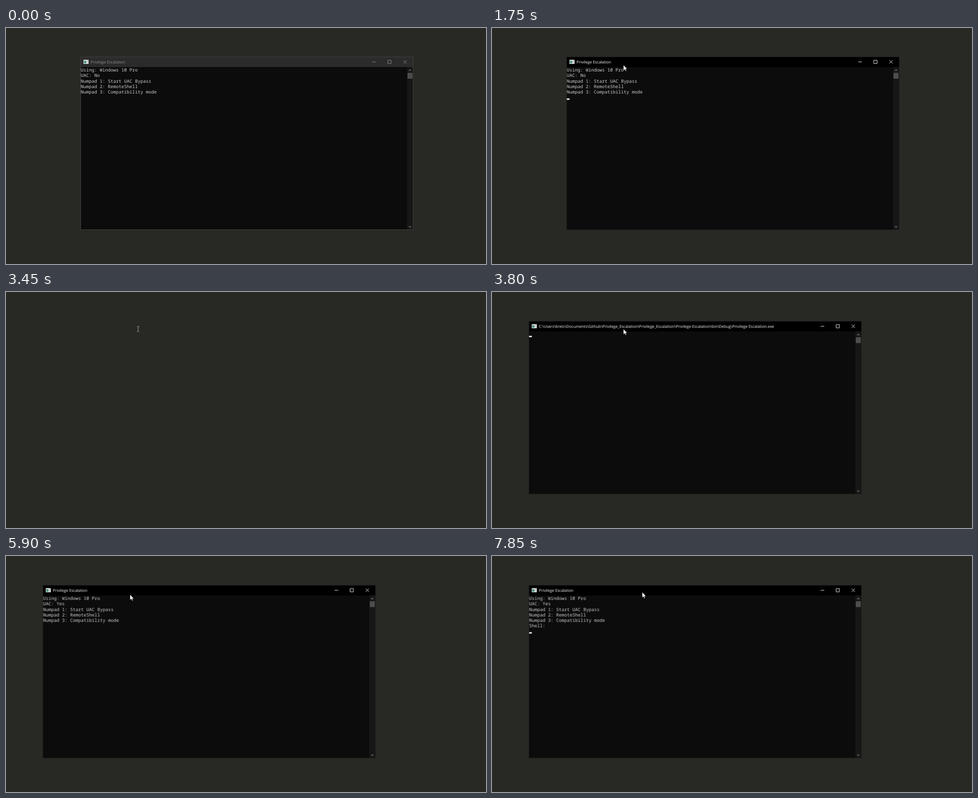
An HTML page for the animation above (8000 ms loop, 1064 px wide and 526 px high).

```html
<!DOCTYPE html>
<html lang="en">
<head>
<meta charset="utf-8">
<title>Console</title>
<style>
html, body { margin: 0; width: 100%; height: 100%; overflow: hidden; background: #282924; }
svg { display: block; width: 1064px; height: 526px; }
text { white-space: pre; text-rendering: geometricPrecision; stroke: none; }
.title { font: 8.62px "Open Sans", "Noto Sans", sans-serif; fill: currentColor; }
.line { font: 10.03px "Noto Sans Mono", "DejaVu Sans Mono", monospace; fill: #ccc; }
.ink { fill: none; stroke: currentColor; stroke-width: 1; }
.caret { fill: #fff; stroke: none; }
.win { fill: #000; color: #fff; stroke: #1c1c1c; }

/* one 8 s clock, 1% = 80 ms, all changes hard */
.win, .caret, .mouse, .t { animation: 8s step-end infinite; }

#first { animation-name: first; }
@keyframes first {
  0% { opacity: 1; fill: #2b2b2b; color: #8e8e8e; stroke: #434343; }
  15% { opacity: 1; fill: #000; color: #fff; stroke: #1c1c1c; }
  43.125%, 100% { opacity: 0; fill: #000; color: #fff; stroke: #1c1c1c; }
}
#second { animation-name: second; }
@keyframes second { 0% { opacity: 0; } 47.5%, 100% { opacity: 1; } }

#path { animation-name: path; }
@keyframes path { 0% { opacity: 1; } 49.375%, 100% { opacity: 0; } }
#ready { animation-name: ready; }
@keyframes ready { 0% { opacity: 0; } 49.375%, 100% { opacity: 1; } }
#key { animation-name: key; }
@keyframes key { 0% { opacity: 0; } 39.375%, 100% { opacity: 1; } }
#shell { animation-name: shell; }
@keyframes shell { 0% { opacity: 0; } 98.125%, 100% { opacity: 1; } }

#caret1 { animation-name: blink1; }
@keyframes blink1 {
  0% { opacity: 0; transform: translate(0, 60.15px); }
  21.875% { opacity: 1; transform: translate(0, 60.15px); }
  28.125% { opacity: 0; transform: translate(0, 60.15px); }
  35% { opacity: 1; transform: translate(0, 60.15px); }
  39.375%, 100% { opacity: 1; transform: translate(6.02px, 60.15px); }
}
#caret2 { animation-name: blink2, row; }
@keyframes blink2 {
  0%, 47.5%, 66.875%, 80%, 93.75%, 100% { opacity: 1; }
  60%, 73.75%, 86.875% { opacity: 0; }
}
@keyframes row {
  0% { transform: none; }
  49.375% { transform: translate(0, 60.15px); }
  98.125%, 100% { transform: translate(0, 72.18px); }
}

.mouse { animation-name: move; }
@keyframes move {
  0% { transform: translate(395px, 513px); }
  8.125% { transform: translate(371px, 412px); }
  8.75% { transform: translate(350px, 324px); }
  9.375% { transform: translate(332px, 250px); }
  10% { transform: translate(317px, 190px); }
  10.625% { transform: translate(306px, 143px); }
  11.25% { transform: translate(298px, 109px); }
  11.875% { transform: translate(293px, 89px); }
  12.5% { transform: translate(291.4px, 82.4px); }
  68.125% { transform: translate(288px, 83px); }
  68.75% { transform: translate(283px, 84px); }
  73.75% { transform: translate(275px, 86px); }
  74.375% { transform: translate(258px, 92px); }
  75% { transform: translate(228px, 103px); }
  75.625% { transform: translate(192px, 115px); }
  76.25% { transform: translate(162px, 124px); }
  77.5% { transform: translate(147px, 127px); }
  81.875% { transform: translate(190px, 118px); }
  82.5% { transform: translate(285px, 92px); }
  83.125%, 100% { transform: translate(333px, 80.6px); }
}
#beam { animation-name: beam; }
@keyframes beam {
  0%, 8.125%, 47.5%, 100% { opacity: 0; }
  7.5%, 43.125% { opacity: 1; }
}
#arrow { animation-name: arrow; }
@keyframes arrow {
  0%, 43.125% { opacity: 0; }
  8.125%, 47.5%, 100% { opacity: 1; }
}
#busy { animation-name: busy; }
@keyframes busy {
  0%, 43.125%, 100% { opacity: 0; transform: translate(10.4px, -.4px); }
  41.25% { opacity: 1; transform: translate(10.4px, -.4px) rotate(-90deg); }
  41.875% { opacity: 1; transform: translate(10.4px, -.4px) rotate(-45deg); }
  42.5% { opacity: 1; transform: translate(10.4px, -.4px); }
}
</style>
</head>
<body>
<svg viewBox="0 0 1064 526">
  <defs>
    <g id="frame">
      <rect x="165.5" y="64.5" width="737" height="385"/>
      <rect x="166" y="87" width="736" height="362" fill="#0c0c0c" stroke="none"/>
      <rect x="889" y="87" width="13" height="362" fill="#171717" stroke="none"/>
      <rect x="890" y="100" width="11" height="13" fill="#4d4d4d" stroke="none"/>
      <path d="M893 95.6l2.5-2.5 2.5 2.5M893 441.6l2.5 2.5 2.5-2.5" fill="none" stroke="#8c8c8c" stroke-width="1.1"/>
      <g stroke="none">
        <rect x="171.8" y="70.8" width="11.2" height="9.2" fill="#e4e6e6"/>
        <rect x="173" y="73" width="4.6" height="5.6" fill="#3f8f78"/>
        <rect x="178.6" y="73" width="3.2" height="5.6" fill="#c3c9c9"/>
        <rect x="180" y="71.6" width="2" height="1" fill="#6b7c86"/>
      </g>
      <path class="ink" d="M812 75.6h8M846.4 71.9h7.2v7.2h-7.2zM880.9 71.9l7.2 7.2M888.1 71.9l-7.2 7.2"/>
    </g>
    <g id="menu">
      <text class="line" x="165.7" y="97.4">Using: Windows 10 Pro</text>
      <text class="line" x="165.7" y="121.5">Numpad 1: Start UAC Bypass</text>
      <text class="line" x="165.7" y="133.5">Numpad 2: RemoteShell</text>
      <text class="line" x="165.7" y="145.5">Numpad 3: Compatibility mode</text>
    </g>
    <rect id="block" x="165.8" y="96.85" width="6.1" height="3"/>
  </defs>

  <rect width="1064" height="526" fill="#282924"/>
  <rect y="525" width="1064" height="1" fill="#222320"/>

  <g id="first" class="win">
    <use href="#frame"/>
    <text class="title" x="187.5" y="79.1">Privilege Escalation</text>
    <use href="#menu"/>
    <text class="line" x="165.7" y="109.4">UAC: No</text>
    <text id="key" class="line t" x="165.7" y="157.6">1</text>
    <use href="#block" id="caret1" class="caret"/>
  </g>

  <g transform="translate(-83.6 .8)">
    <g id="second" class="win">
      <use href="#frame"/>
      <text id="path" class="title t" x="187.5" y="79.1">C:\Users\brelo\Documents\Github\Privilege_Escalation\Privilege_Escalation\Privilege Escalation\bin\Debug\Privilege Escalation.exe</text>
      <g id="ready" class="t">
        <text class="title" x="187.5" y="79.1">Privilege Escalation</text>
        <use href="#menu"/>
        <text class="line" x="165.7" y="109.4">UAC: Yes</text>
        <text id="shell" class="line t" x="165.7" y="157.6">Shell:</text>
      </g>
      <use href="#block" id="caret2" class="caret"/>
    </g>
  </g>

  <g class="mouse">
    <path id="beam" class="t" d="M-1 -5.6h1.6l.8.6.8-.6H3.8M1.4 -5V5M-1 5.6h1.6l.8-.6.8.6H3.8" fill="none" stroke="#c4c4c0" stroke-width=".9"/>
    <path id="arrow" class="t" d="M0 0V12.2L2.8 9.6 4.7 13.8 6.5 13 4.7 8.9H8.3Z" fill="#fff" stroke="#000" stroke-width=".5"/>
    <g id="busy" class="t" fill="none" stroke-width="2.5">
      <circle r="4.5" stroke="#1c86dc"/>
      <path d="M-4.5 0A4.5 4.5 0 0 1 0 -4.5" stroke="#4fb4f5"/>
    </g>
  </g>
</svg>
</body>
</html>
```
